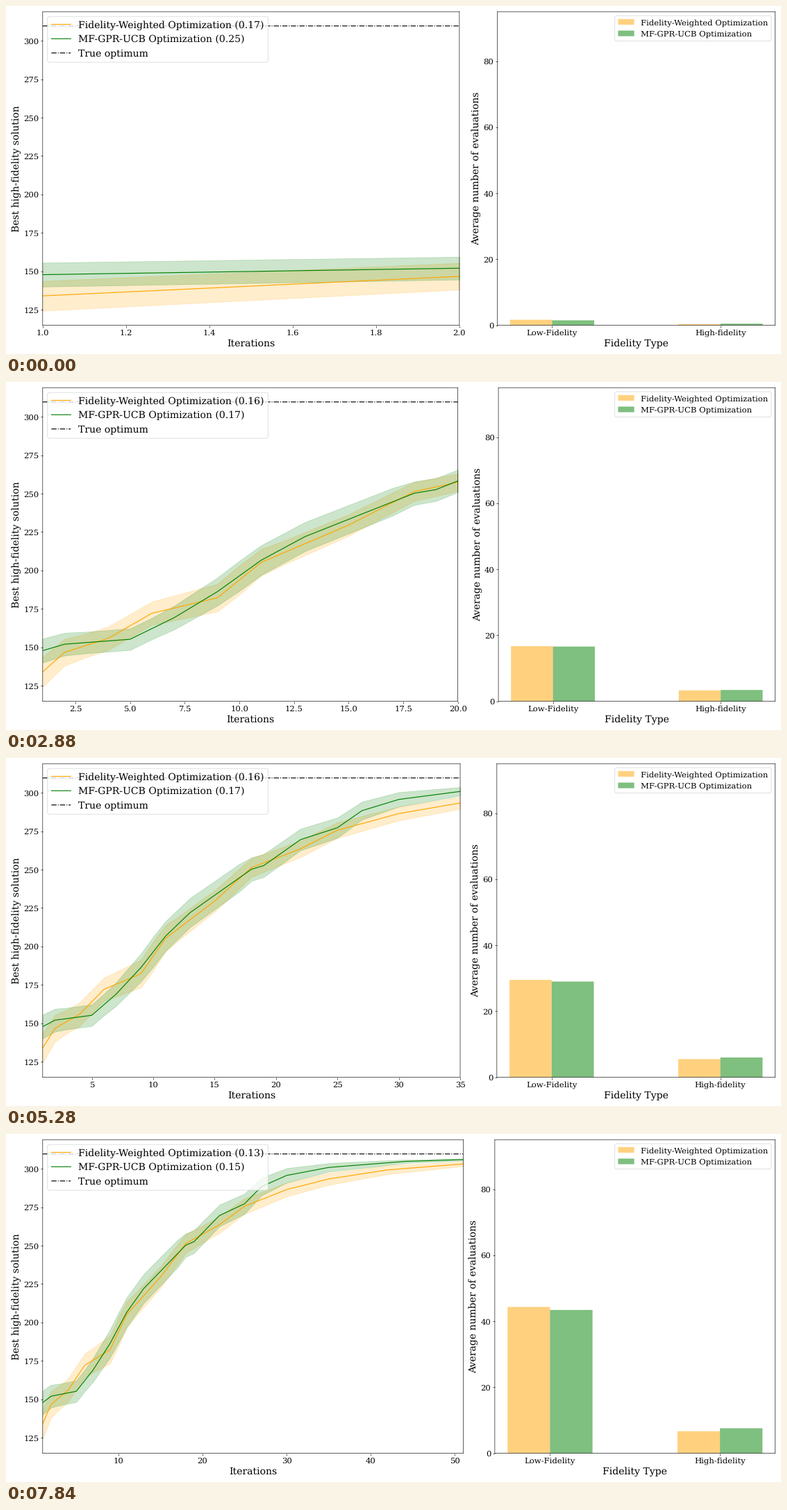
Recreate the animation shown at these times as a matplotlib script. Size 1116 by 502 pixels, loop 8 s.

```python
import numpy as np
import matplotlib.pyplot as plt
from matplotlib.animation import FuncAnimation

# Unsnapped paths and unhinted text keep sub-pixel positions.
plt.rcParams.update({
    "font.family": "DejaVu Serif",
    "text.hinting": "none",
    "path.snap": False,
})

FRAMES, INTERVAL = 50, 160
OPTIMUM = 309.5756
LABEL_SIZE, TICK_SIZE = 18, 15
BAR_WIDTH = 0.25
STEPS = np.arange(1, FRAMES + 2)


class Method:
    """One optimizer; its curves run straight between {step: value} points."""

    def __init__(self, name, color, mean, spread, high):
        self.name, self.color = name, color
        self.mean, self.spread, self.high = (
            np.interp(STEPS, list(p), list(p.values()))
            for p in (mean, spread, high))


METHODS = [
    Method(
        "Fidelity-Weighted Optimization", "orange",
        mean={1: 134.1, 2: 146.8, 4: 155.9, 6: 172.2, 9: 182.3, 11: 205.3,
              15: 229.5, 18: 251.3, 22: 263.5, 25: 275.6, 30: 286.4,
              35: 293.3, 42: 299.2, 51: 303.1},
        spread={1: 9.7, 3: 7.7, 6: 7.6, 10: 9.5, 12: 7.8, 20: 5.7, 35: 3.9,
                51: 1.5},
        high={2: 0.333, 9: 1.17, 25: 4.25, 35: 5.5, 51: 6.67},
    ),
    Method(
        "MF-GPR-UCB Optimization", "green",
        mean={1: 147.9, 2: 152.1, 5: 155.3, 7: 169.2, 9: 186.3, 11: 206.7,
              13: 222.0, 18: 250.2, 19: 252.6, 22: 269.5, 25: 277.2,
              27: 288.3, 30: 295.6, 35: 300.8, 44: 304.7, 51: 305.9},
        spread={1: 7.8, 3: 7, 6: 7, 10: 9.8, 17: 9, 18: 7.6, 25: 6.6,
                35: 2.8, 45: 1, 51: 0.7},
        high={2: 0.5, 9: 1.38, 15: 2.6, 25: 4.25, 35: 6, 51: 7.58},
    ),
]

fig, (curves, bars) = plt.subplots(
    1, 2, figsize=(20, 9), dpi=55.8, gridspec_kw={"width_ratios": [3, 2]})


def finish(ax, xlabel, ylabel, legend_loc, legend_size):
    ax.set_xlabel(xlabel, fontsize=LABEL_SIZE)
    ax.set_ylabel(ylabel, fontsize=LABEL_SIZE)
    ax.tick_params(labelsize=TICK_SIZE)
    ax.legend(loc=legend_loc, fontsize=legend_size)


def draw_curves(n):
    curves.clear()
    x = STEPS[:n]
    for m in METHODS:
        mean, spread = m.mean[:n], m.spread[:n]
        share = m.high[n - 1] / n
        curves.plot(x, mean, color=m.color, label=f"{m.name} ({share:.2f})")
        curves.fill_between(x, mean - spread, mean + spread,
                            color=m.color, alpha=0.2)
    curves.plot([1, n], [OPTIMUM] * 2, "-.", color="black", label="True optimum")
    curves.set_xlim(1, n)
    curves.set_ylim(115, 318.86)
    finish(curves, "Iterations", "Best high-fidelity solution",
           "upper left", LABEL_SIZE)


def draw_bars(n):
    bars.clear()
    groups = np.arange(2)
    for m, side in zip(METHODS, (-0.5, 0.5)):
        high = m.high[n - 1]
        bars.bar(groups + side * BAR_WIDTH, [n - high, high], BAR_WIDTH,
                 color=m.color, alpha=0.5, label=m.name)
    bars.set_xticks(groups, ["Low-Fidelity", "High-fidelity"])
    bars.set_xlim(-0.325, 1.325)
    bars.set_ylim(0, 95)
    finish(bars, "Fidelity Type", "Average number of evaluations",
           "upper right", TICK_SIZE)


def draw(frame):
    n = frame + 2
    draw_curves(n)
    draw_bars(n)
    # Refit from a fixed layout so every loop gives the same margins.
    fig.subplots_adjust(left=0.05, right=0.99, bottom=0.08, top=0.98, wspace=0.1)
    fig.tight_layout()
    return []


anim = FuncAnimation(fig, draw, frames=FRAMES, interval=INTERVAL,
                     init_func=lambda: [], repeat=True, repeat_delay=0)
plt.show()
```
